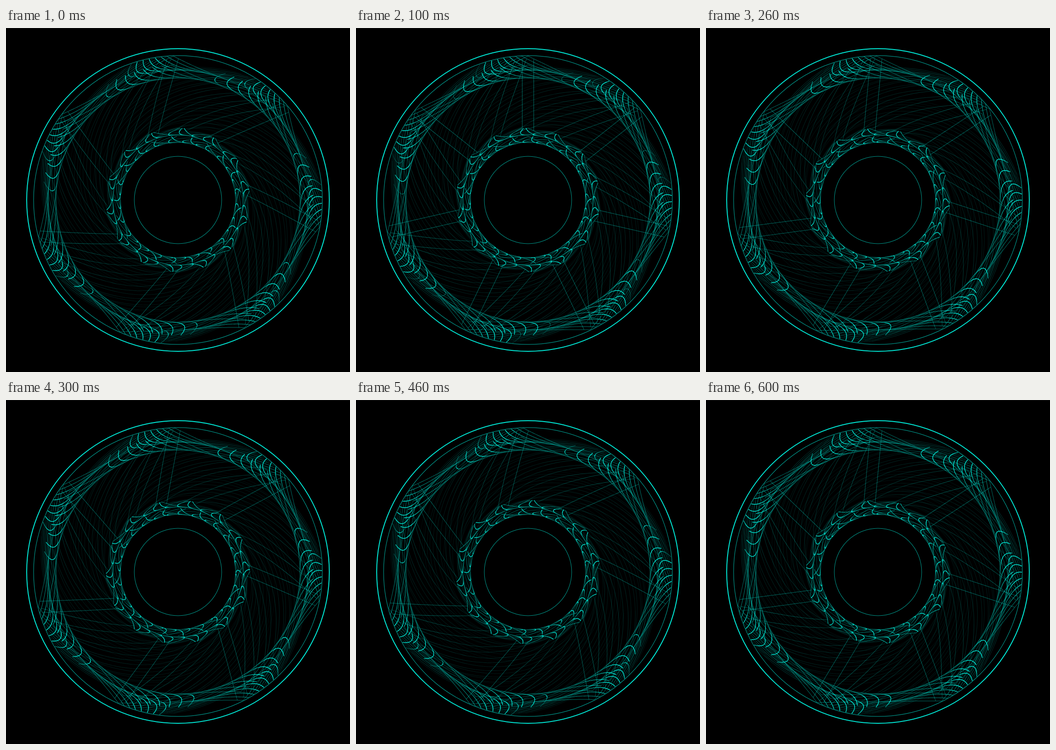
An HTML page with a canvas that plays this animation: 748x748 px, repeating every 700 ms.

```html
<!DOCTYPE html>
<html lang="en">
<head>
<meta charset="utf-8">
<title>Sheared wheel</title>
<style>
  html, body { margin: 0; width: 100%; height: 100%; overflow: hidden; background: #000; }
  canvas { display: block; width: 748px; height: 748px; }
</style>
</head>
<body>
<canvas id="stage" width="748" height="748"></canvas>
<script>
const SIZE = 748, MID = SIZE / 2, SIDES = 7;
const SECTOR = 2 * Math.PI / SIDES, HALF = SECTOR / 2;
const RINGS = [282, 265, 141, 125];   // inradii of the heptagons
const COLOR = '#00e6d4';
const LEVELS = 40;
const HOLD = 100;
const PHASES = [3, 0, 1, 2, 3, 0, 1]; // quarter steps of shear

const clamp = (v, lo, hi) => Math.max(lo, Math.min(hi, v));

// Flat rotation curve seen from a turning frame: angle per step in radians.
const turn = r => (7540 / r - 21.66) * Math.PI / 180;

function shear([x, y], age) {
  const r = Math.hypot(x, y);
  const a = Math.atan2(x, -y) - age * turn(r);
  return [r * Math.sin(a), -r * Math.cos(a)];
}

function line(from, to, count) {
  return Array.from({ length: count + 1 }, (_, i) => {
    const k = i / count;
    return [from[0] + (to[0] - from[0]) * k, from[1] + (to[1] - from[1]) * k];
  });
}

// One sector of the wheel: four heptagon edges and two spoke sides.
function sector() {
  const lines = RINGS.map(rho => {
    const R = rho / Math.cos(HALF);
    return line([0, -R], [R * Math.sin(SECTOR), -R * Math.cos(SECTOR)], 100);
  });
  for (const x of [-12.5, 12.5]) lines.push(line([x, -150], [x, -307], 90));
  return lines;
}

function circle(ctx, r, width, alpha) {
  ctx.globalAlpha = alpha;
  ctx.lineWidth = width;
  ctx.beginPath();
  ctx.arc(0, 0, r, 0, 2 * Math.PI);
  ctx.stroke();
}

// Ink thins where a line is stretched and thickens where it is squeezed.
function addInk(buckets, pts, age) {
  const fade = clamp((8.3 - age) / 1.1, 0, 1);
  const moved = pts.map(p => shear(p, age));
  for (let i = 1; i < pts.length; i++) {
    const [a, b] = [moved[i - 1], moved[i]];
    const before = Math.hypot(pts[i][0] - pts[i - 1][0], pts[i][1] - pts[i - 1][1]);
    const after = Math.hypot(b[0] - a[0], b[1] - a[1]);
    const ink = clamp(0.44 * fade * (before / after) ** 1.15, 0, 1);
    const level = Math.round(ink * LEVELS);
    if (!level) continue;
    buckets[level].moveTo(a[0], a[1]);
    buckets[level].lineTo(b[0], b[1]);
  }
}

function renderPose(quarter) {
  const canvas = document.createElement('canvas');
  canvas.width = canvas.height = SIZE;
  const ctx = canvas.getContext('2d');
  ctx.fillStyle = '#000';
  ctx.fillRect(0, 0, SIZE, SIZE);
  ctx.fillStyle = '#141414';
  ctx.fillRect(0, 0, SIZE, 1);
  ctx.translate(MID, MID);
  ctx.strokeStyle = COLOR;

  const buckets = Array.from({ length: LEVELS + 1 }, () => new Path2D());
  const shape = sector();
  for (let age = quarter / 4; age < 8.3; age++)
    for (const pts of shape) addInk(buckets, pts, age);

  buckets.forEach((path, level) => {
    const ink = level / LEVELS;
    ctx.globalAlpha = ink;
    ctx.lineWidth = 1 + 0.5 * clamp((ink - 0.5) * 2, 0, 1);
    for (let i = 0; i < SIDES; i++) {
      ctx.stroke(path);
      ctx.rotate(SECTOR);
    }
  });

  circle(ctx, 329, 2, 1);
  circle(ctx, 314, 1, 0.75);
  circle(ctx, 95, 1, 0.65);
  return canvas;
}

const poses = [0, 1, 2, 3].map(renderPose);
const stage = document.getElementById('stage').getContext('2d');
const start = performance.now();
let shown = -1;

function draw() {
  const step = Math.floor((performance.now() - start) / HOLD) % PHASES.length;
  if (PHASES[step] !== shown) {
    shown = PHASES[step];
    stage.drawImage(poses[shown], 0, 0);
  }
  requestAnimationFrame(draw);
}
draw();
</script>
</body>
</html>
```
